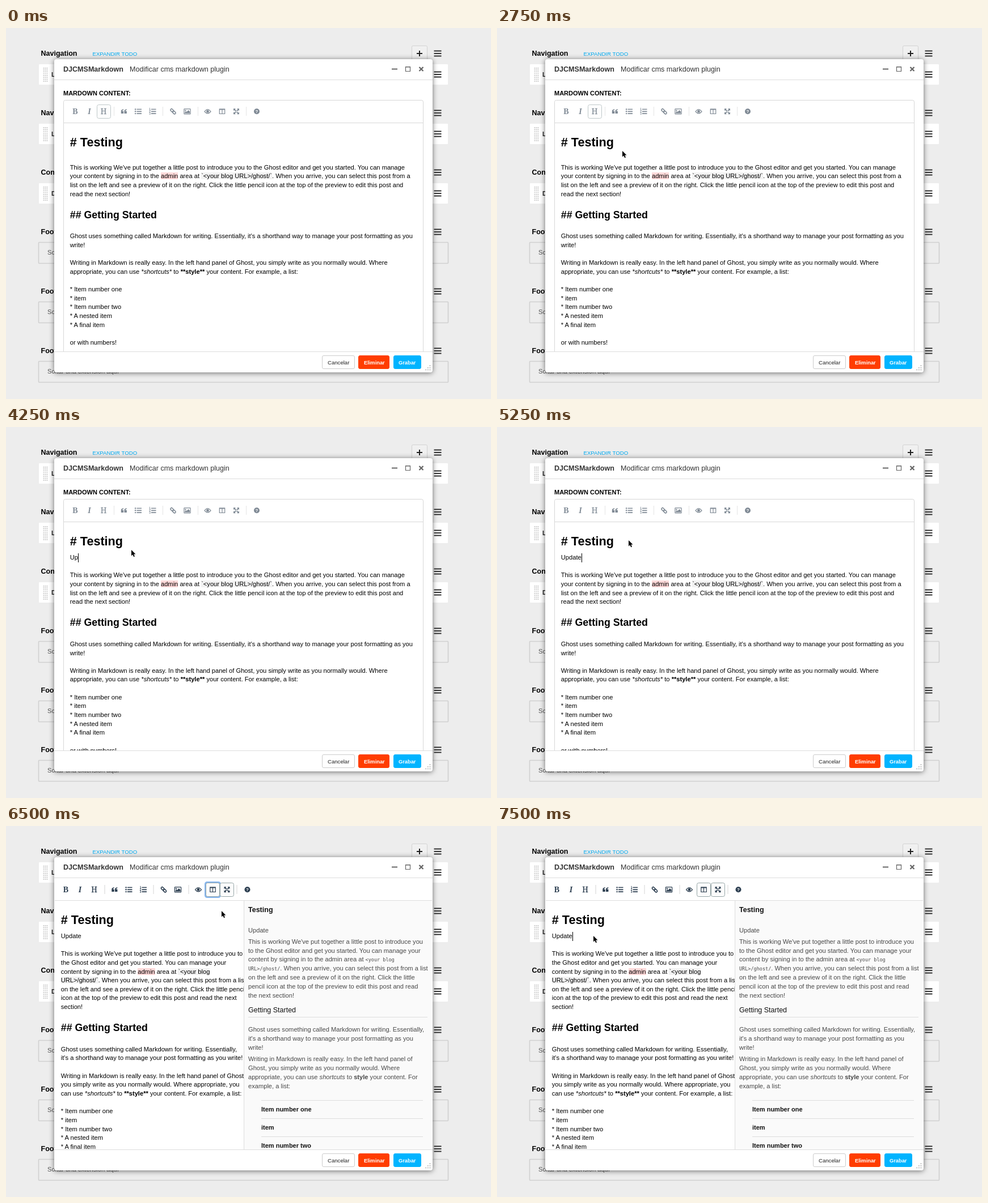
An HTML page that plays this animation: 855 px wide and 655 px high, repeating every 8 s.

```html
<!DOCTYPE html>
<html lang="es">
<head>
<meta charset="utf-8">
<title>Markdown plugin</title>
<style>
  html, body { margin: 0; width: 855px; height: 655px; overflow: hidden; background: #ededed; }
  body, text { font-family: "Liberation Sans", Arial, sans-serif; }
  svg, #editor, #preview { position: absolute; overflow: hidden; }
  svg { left: 0; top: 0; }
  .serif { font: bold 14px "Liberation Serif", serif; text-anchor: middle; }
  #editor, #preview { box-sizing: border-box; white-space: pre; font-size: 11.13px; }
  #editor { left: 102px; top: 168px; width: 633px; height: 403px; padding: 11.6px 10.8px; line-height: 15.66px; color: #000; }
  #editor.narrow { left: 86px; top: 132px; width: 333px; height: 439px; }
  #editor div { position: relative; min-height: 15.66px; }
  #editor .h1 { font: bold 21.6px/43.3px "Liberation Sans", Arial, sans-serif; }
  #editor .h2 { font: bold 17.8px/27.7px "Liberation Sans", Arial, sans-serif; }
  #editor mark { background: rgba(255, 0, 0, .15); color: inherit; }
  #editor code { background: rgba(0, 0, 0, .05); font: inherit; }
  #editor i { position: absolute; top: 0; bottom: 0; width: 1px; background: #000; }
  #preview { left: 420px; top: 132px; width: 331px; height: 439px; background: #fafafa; color: #484848; line-height: 15.85px; }
  #preview div { position: absolute; left: 7px; }
  #preview .title { color: #111; font-size: 12.5px; }
  #preview .item { color: #111; left: 30px; width: 285px; border-top: 1px solid #ddd; font: bold 11px/31px "Liberation Sans", Arial, sans-serif; }
  #preview hr { position: absolute; left: 7px; top: 205px; width: 316px; margin: 0; border: 0; border-top: 1px solid #ddd; }
  #preview code { font: 8.5px/1 "DejaVu Sans Mono", monospace; }
</style>
</head>
<body>
<svg id="stage" width="855" height="655"></svg>
<div id="editor"></div>
<div id="preview"></div>
<svg width="855" height="655"><path id="pointer" d="M0 0V10.6L2.4 8.3L4.2 12.2L5.9 11.4L4.3 7.6H7.5Z" stroke="#fff" stroke-width="1" paint-order="stroke"/></svg>
<script>
const $ = id => document.getElementById(id);
const show = (id, on) => { $(id).style.display = on ? '' : 'none'; };

const text = (x, y, size, fill, str, extra = '') =>
  `<text x="${x}" y="${y}" font-size="${size}" fill="${fill}" ${extra}>${str}</text>`;
const bold = 'font-weight="bold"';
const rect = (x, y, w, h, attrs) => `<rect x="${x}" y="${y}" width="${w}" height="${h}" ${attrs}/>`;
const at = (x, y, body) => `<g transform="translate(${x} ${y})">${body}</g>`;

// Page behind the dialog
const menu = y => at(761, y, '<path d="M-6.5-4.5h13M-6.5 0h13M-6.5 4.5h13" stroke="#333" stroke-width="2.1"/>');
const heading = (name, i) => text(61.5, 49 + 105 * i, 12.5, '#000', name, bold) + menu(45 + 105 * i);
const plugin = (name, i) => at(0, 105 * i,
  rect(58, 64, 721, 36, 'rx="1" fill="#fff"') +
  '<path d="M66.5 70v25M69.5 70v25M72.5 70v25" stroke="#c4c4c4" stroke-width="1.8" stroke-dasharray="1.7 1.6"/>' +
  text(80, 86, 11, '#222', name, bold)) + menu(82 + 105 * i);
const dropZone = y => rect(57.5, y + .5, 722, 37, 'rx="1" fill="none" stroke="#d0d0d0" stroke-width="1.6"') +
  text(73, y + 22, 11.1, '#555', 'Soltar una extensión aquí');

const page = ['Navigation', 'Navigation', 'Content', 'Footer', 'Footer', 'Footer'].map(heading).join('') +
  ['Link', 'Link', 'Default'].map(plugin).join('') + [378, 483, 588].map(dropZone).join('') +
  text(152.5, 49, 9.65, '#00aaf0', 'EXPANDIR TODO') +
  rect(715.5, 31.5, 27, 27, 'rx="2" fill="#f0f0f0" stroke="#d2d2d2"') +
  '<path d="M724 45h10M729 40v10" stroke="#222" stroke-width="2"/>';

// Dialog frame
const button = (x, w, fill, border, label) => rect(x + .5, 578.5, w - 1, 23, `rx="2.5" fill="${fill}" stroke="${border}"`) + label;
const grip = [0, 1, 2].map(r => [0, 1, 2].filter(c => r + c > 1)
  .map(c => rect(739.5 + c * 3.6, 595.5 + r * 3.6, 1.5, 1.5, 'fill="#999"')).join('')).join('');
const dialog = rect(85, 55, 667, 553, 'rx="4" fill="#fff" style="filter:drop-shadow(0 1px 5px rgba(0,0,0,.55))"') +
  '<path d="M85 91.5h667M85 571.5h667" stroke="#ddd"/>' +
  text(101, 77, 12.55, '#333', 'DJCMSMarkdown', bold) +
  text(218, 77, 12.55, '#333', 'Modificar cms markdown plugin') +
  `<g fill="none" stroke="#666"><path d="M680 72.5h10" stroke-width="2"/>
   <path d="M704.5 68.5h8v8h-8zM704 69h9" stroke-width="1.2"/>
   <path d="M728.5 69l7 7M735.5 69l-7 7" stroke-width="2.3"/></g>` +
  button(557, 58, '#fff', '#ccc', text(567, 594, 9.6, '#222', 'Cancelar')) +
  button(621, 55, '#ff3d00', '#ff3d00', text(631, 594, 9.3, '#fff', 'Eliminar', bold)) +
  button(683, 49, '#00b4ff', '#00b4ff', text(692, 594, 9.3, '#fff', 'Grabar', bold)) + grip;

// Toolbar
const letter = (str, extra = '') => `<text class="serif" y="4.7" ${extra}>${str}</text>`;
const line = '<g fill="none" stroke="#2c3e50" stroke-width="1.2">';
const quote = 'M-.8-4v1.3q-2.2.4-2.2 2.2h2.2v4.3h-4.4v-4q0-3.4 4.4-3.8z';
const bars = '<path d="M-2.5-3.8h8.5M-2.5 0h8.5M-2.5 3.8h8.5" stroke="#2c3e50" stroke-width="1.7"/>';
const rows = [-3.8, 0, 3.8];
const corner = a => `<path transform="rotate(${a})" d="M-5-5h4l-1.3 1.3 2.3 2.3-1.3 1.3-2.3-2.3-1.4 1.4z"/>`;
const icons = {
  122: letter('B'), 147: letter('I', 'style="font-style:italic"'), 172: letter('H', 'style="font-weight:normal" stroke="#2c3e50" stroke-width=".3"'),
  208: `<path d="${quote}"/><path transform="translate(5.7)" d="${quote}"/>`,
  233: bars + rows.map(y => `<circle cx="-4.9" cy="${y}" r="1.2"/>`).join(''),
  258.5: bars + rows.map((y, i) => text(-6.2, y + 1.6, 4.8, '#2c3e50', i + 1, bold)).join(''),
  294.5: line + `<g transform="rotate(45)" stroke-width="1.6">${rect(-5.6, -1.9, 6, 3.8, 'rx="1.7"')}${rect(-.4, -1.9, 6, 3.8, 'rx="1.7"')}</g></g>`,
  319.5: line + rect(-5.6, -4.5, 11.2, 9, 'rx=".6"') + '</g><circle cx="-3" cy="-1.7" r="1.2"/><path d="M-4.4 3.3v-1.6l2-2 1.3 1.3 3-3.2 2.6 2.7v2.8z"/>',
  355.5: line + '<path d="M-5.5.2Q0-7.2 5.5.2Q0 6.8-5.5.2z"/></g><circle r="2.4"/>',
  381: line + '<path d="M-4.7-4.2h9.4v8.4h-9.4zM0-4v8M-4.7-3.5h9.4"/></g>',
  406: [0, 90, 180, 270].map(corner).join(''),
  442: '<circle r="5"/>' + text(0, 2.9, 8, '#fff', '?', bold + ' text-anchor="middle"')
};
const box = (id, x) => rect(x - 12, 135.5, 24, 24, `id="${id}" rx="3" fill="#fcfcfc" stroke="#95a5a6"`);
const toolbar = `<g id="toolbar" fill="#2c3e50">
  <path id="outline" d="M101.5 167V130.5q0-3 3-3H732.5q3 0 3 3V167" fill="none" stroke="#bbb"/>` +
  rect(368, 134.5, 26, 26, 'id="ring" rx="3" fill="none" stroke="#86b6ef" stroke-width="3"') +
  box('boxH', 172.5) + box('boxSplit', 381) + box('boxFull', 406) +
  '<path d="M190.5 139v16M276.5 139v16M338.5 139v16M423.5 139v16" stroke="#d4d4d4"/>' +
  Object.entries(icons).map(([x, icon]) => at(x, 147.3, icon)).join('') + '</g>';

const wideFrame = '<g id="wideFrame">' + text(101, 119, 11, '#000', 'MARDOWN CONTENT:', bold) +
  '<path d="M101.5 167V571M735.5 167V571M101 167.5H736" stroke="#d8d8d8"/></g>';
const splitFrame = '<path id="splitFrame" d="M86 131.5H751M419.5 131V571" stroke="#ddd"/>';
$('stage').innerHTML = page + dialog + wideFrame + splitFrame + toolbar;

// Document text
const list = ['', '* Item number one', '* item', '* Item number two', '* A nested item', '* A final item', '', 'or with numbers!'];
const getStarted = ['', '## Getting Started', ''];
const wide = `
This is working We've put together a little post to introduce you to the Ghost editor and get you started. You can manage
your content by signing in to the <mark>admin</mark> area at <code>\`&lt;your blog URL&gt;/ghost/\`</code>. When you arrive, you can select this post from a
list on the left and see a preview of it on the right. Click the little pencil icon at the top of the preview to edit this post and
read the next section!`.split('\n').concat(getStarted, `Ghost uses something called Markdown for writing. Essentially, it's a shorthand way to manage your post formatting as you
write!

Writing in Markdown is really easy. In the left hand panel of Ghost, you simply write as you normally would. Where
appropriate, you can use <em>*shortcuts*</em> to <b>**style**</b> your content. For example, a list:`.split('\n'), list);
const narrow = `
This is working We've put together a little post to introduce you to
the Ghost editor and get you started. You can manage your
content by signing in to the <mark>admin</mark> area at <code>\`&lt;your blog</code>
<code>URL&gt;/ghost/\`</code>. When you arrive, you can select this post from a list
on the left and see a preview of it on the right. Click the little pencil
icon at the top of the preview to edit this post and read the next
section!`.split('\n').concat(getStarted, `Ghost uses something called Markdown for writing. Essentially,
it's a shorthand way to manage your post formatting as you write!

Writing in Markdown is really easy. In the left hand panel of Ghost,
you simply write as you normally would. Where appropriate, you
can use <em>*shortcuts*</em> to <b>**style**</b> your content. For example, a list:`.split('\n'), list);

const lineClass = str => str.startsWith('# ') ? 'h1' : str.startsWith('## ') ? 'h2' : '';
const render = lines => lines.map(str => `<div class="${lineClass(str)}">${str}</div>`).join('');

const block = (y, html, cls = '') => `<div class="${cls}" style="top:${y - 132}px">${html}</div>`;
$('preview').innerHTML = block(140.5, '<b>Testing</b>', 'title') + block(176.8, 'Update') +
  block(196.8, `This is working We've put together a little post to introduce you
to the Ghost editor and get you started. You can manage your
content by signing in to the admin area at <code>&lt;your blog</code>
<code>URL&gt;/ghost/</code>. When you arrive, you can select this post from a list
on the left and see a preview of it on the right. Click the little
pencil icon at the top of the preview to edit this post and read
the next section!`) + block(317.5, 'Getting Started', 'title') + '<hr>' +
  block(352.3, `Ghost uses something called Markdown for writing. Essentially,
it's a shorthand way to manage your post formatting as you
write!`) + block(404.2, `Writing in Markdown is really easy. In the left hand panel of
Ghost, you simply write as you normally would. Where
appropriate, you can use <em>shortcuts</em> to <b>style</b> your content. For
example, a list:`) +
  ['Item number one', 'item', 'Item number two'].map((s, i) => block(484 + 32 * i, s, 'item')).join('');

// Timeline
const STEP = 250, LOOP = 8000, ENTER = 3000, TYPE = 4000, SPLIT = 6500, CLICK = 7500;
const path = [[250, 507, 393], [750, 193, 200], [1000, 207, 212], [1250, 368, 338], [2250, 221, 217],
  [5000, 221, 217], [5250, 232, 200], [6250, 381, 150], [6500, 380, 150], [7250, 170, 194], [LOOP, 170, 194]];
const caretToggles = [1000, 1750, 2250, 2750, 3000, 3500, 4000, 5500, 6000, 6250, CLICK];

function pointerAt(t) {
  const i = Math.max(1, path.findIndex(p => p[0] > t));
  const [a, b] = [path[i - 1], path[i]];
  const k = (t - a[0]) / (b[0] - a[0]);
  return [a[1] + (b[1] - a[1]) * k, a[2] + (b[2] - a[2]) * k];
}

function draw(t) {
  const split = t >= SPLIT;
  const [x, y] = pointerAt(t);
  const hover = !split && t >= ENTER && y < 167;
  const caret = caretToggles.filter(c => c <= t).length % 2 ? '<i></i>' : '';
  const typed = 'Update'.slice(0, Math.max(0, (t - TYPE) / STEP * 2));
  const head = t < ENTER ? ['# Testing' + caret] : ['# Testing', typed + caret];

  $('editor').className = split ? 'narrow' : '';
  $('editor').innerHTML = render(head.concat(split ? narrow : wide));
  $('toolbar').setAttribute('transform', split ? 'translate(-16.5 -35)' : '');
  $('toolbar').setAttribute('opacity', split ? 1 : hover ? .9 : .6);
  $('pointer').setAttribute('transform', `translate(${x} ${y})`);
  show('pointer', t >= path[0][0]);
  show('preview', split);
  show('splitFrame', split);
  show('wideFrame', !split);
  show('outline', !split);
  show('boxH', t < ENTER);
  show('boxSplit', split || hover && Math.abs(x - 381) < 12);
  show('boxFull', split);
  show('ring', split && t < CLICK);
}

let last = -1;
function tick() {
  const t = Math.floor(performance.now() % LOOP / STEP) * STEP;
  if (t !== last) draw(last = t);
  requestAnimationFrame(tick);
}
tick();
</script>
</body>
</html>
```
